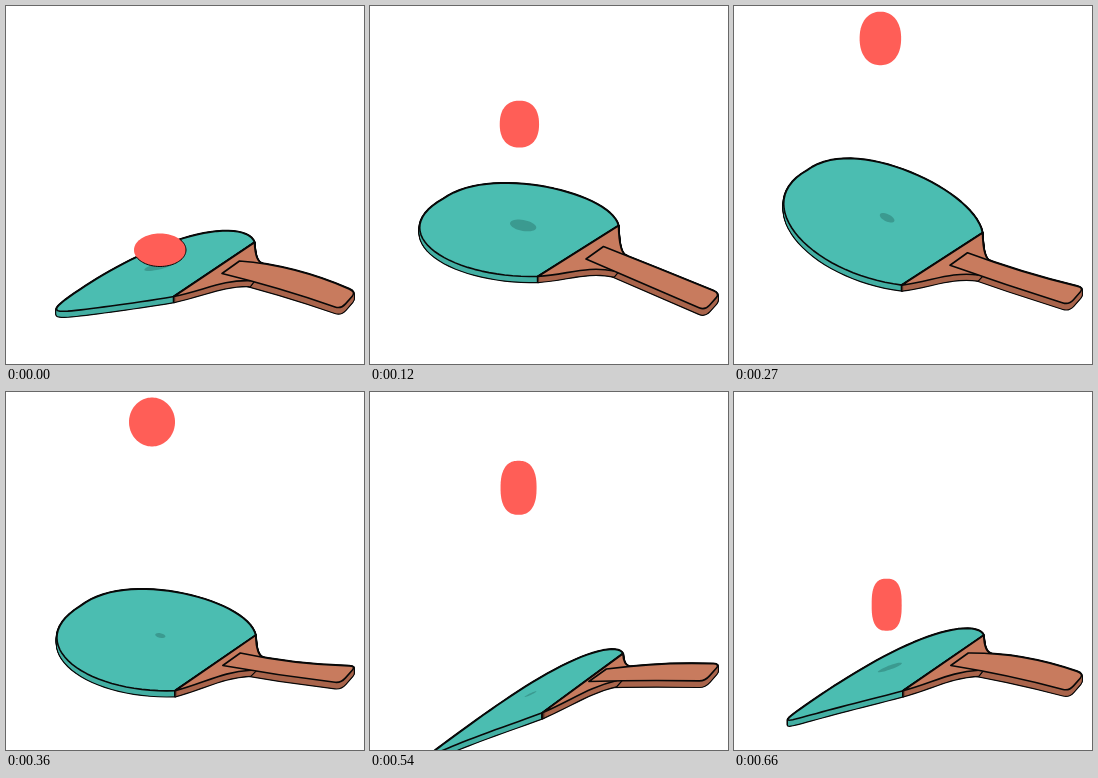
These frames come from a looping animation (358 px wide and 358 px high, 690 ms). An HTML page with a canvas:

```html
<!DOCTYPE html>
<html lang="en">
<head>
<meta charset="utf-8">
<title>Bouncing ball</title>
<style>
html, body { margin: 0; width: 100%; height: 100%; overflow: hidden; background: #fff; }
canvas { display: block; width: 358px; height: 358px; }
</style>
</head>
<body>
<canvas id="stage" width="358" height="358"></canvas>
<script>
const ctx = document.getElementById('stage').getContext('2d');
const LOOP = 690, STEP = 30;
const color = {
  rubber: '#4bbdb1', rubberSide: '#43afa3', wood: '#c87b5e', woodSide: '#a9644b',
  ball: '#ff5e57', shadow: '#3b9a90', ink: '#080808'
};

// Key poses of the swing; everything else is derived from these.
const keyTimes = [0, 60, 180, 360, 450, 540, 660];
const tracks = {
  hinge: [255, 246, 239, 261, 277, 277, 261],
  tilt: [20, -17, -78, -57, 30, 53, 38],
  bladeBend: [-9, 0, 0, 2, -6, -9, -9],
  grip: [286, 286, 288, 274, 270, 272, 282],
  handleBend: [-5.5, -1.5, 0, 3, 0.5, -2.5, -5.5],
  ballWidth: [26, 22, 18.7, 23, 21.5, 18, 15],
  ballHeight: [16.5, 19, 27.5, 24.5, 25.5, 27, 26],
  shadow: [1, 1, 0.67, 0.33, 0.23, 0.4, 0.8]
};

// Smooth periodic interpolation with parabolic tangents.
function sample(keys, t) {
  const n = keyTimes.length;
  let i = n - 1;
  while (keyTimes[i] > t) i--;
  const key = k => keys[(k + n) % n];
  const time = k => keyTimes[(k + n) % n] + Math.floor(k / n) * LOOP;
  const span = k => time(k + 1) - time(k);
  const slope = k => (key(k + 1) - key(k)) / span(k);
  const tangent = k =>
    (slope(k - 1) * span(k) + slope(k) * span(k - 1)) / (span(k - 1) + span(k));
  const h = span(i), s = (t - time(i)) / h, s2 = s * s, s3 = s2 * s;
  return key(i) * (2 * s3 - 3 * s2 + 1) + key(i + 1) * (3 * s2 - 2 * s3)
    + h * ((s3 - 2 * s2 + s) * tangent(i) + (s3 - s2) * tangent(i + 1));
}

function poseAt(t) {
  const pose = {};
  for (const name in tracks) pose[name] = sample(tracks[name], t);
  return pose;
}

const mix = (a, b, k) => [a[0] + (b[0] - a[0]) * k, a[1] + (b[1] - a[1]) * k];
const quadAt = (a, b, c, k) => mix(mix(a, b, k), mix(b, c, k), k);
const cubicAt = (a, b, c, d, k) => mix(quadAt(a, b, c, k), quadAt(b, c, d, k), k);

function closedPath(points) {
  const path = new Path2D();
  for (const p of points) path.lineTo(...p);
  path.closePath();
  return path;
}

// Flat blade: u runs along the hinge edge, v from the hinge to the tip.
function bladeShape(pose) {
  const drop = pose.hinge - 255, shift = 0.2 * Math.max(0, drop);
  const front = [168 + shift, 290.5 + 1.38 * drop];
  const back = [248.5 + shift, 236.5 + 1.15 * drop];
  const mid = mix(front, back, 0.5);
  const reach = -135 + 0.0023 * Math.max(0, pose.tilt) ** 2;
  const place = ([u, v]) => [
    mid[0] + u * (back[0] - front[0]) + v * reach,
    mid[1] + u * (back[1] - front[1]) + v * pose.tilt + 4 * v * (1 - v) * pose.bladeBend
  ];
  const outline = [];
  for (let i = 0; i <= 30; i++) {
    outline.push(cubicAt([-0.5, 0], [-0.9, 0.4], [-0.72, 1.03], [0, 1], i / 30));
  }
  for (let i = 1; i <= 30; i++) {
    outline.push(cubicAt([0, 1], [0.66, 1.03], [0.9, 0.3], [0.5, 0], i / 30));
  }
  return { front, back, place, path: closedPath(outline.map(place)) };
}

function shadowPath(blade, size) {
  const points = [];
  for (let i = 0; i < 40; i++) {
    const a = i * Math.PI / 20;
    points.push(blade.place([0.07 + 0.09 * size * Math.cos(a), 0.45 + 0.1 * size * Math.sin(a)]));
  }
  return closedPath(points);
}

function handleShape({ hinge, grip, handleBend }) {
  const shift = 0.13 * Math.max(0, hinge - 255);
  const inTop = [233.5 + shift, hinge], inLow = [216 + shift, hinge + 12.5];
  const outTop = [350, grip], outLow = [335, grip + 17];
  const bent = (a, b, bend) => {
    const m = mix(a, b, 0.5);
    return [m[0], m[1] + 2 * bend];
  };
  const topMid = bent(inTop, outTop, handleBend);
  const lowMid = bent(inLow, outLow, 0.3 * handleBend);
  const path = new Path2D();
  path.moveTo(...inTop);
  path.quadraticCurveTo(...mix(inTop, topMid, 0.94), ...quadAt(inTop, topMid, outTop, 0.94));
  path.quadraticCurveTo(...outTop, ...mix(outTop, outLow, 0.25));
  path.lineTo(...mix(outTop, outLow, 0.7));
  path.quadraticCurveTo(...outLow, ...quadAt(inLow, lowMid, outLow, 0.95));
  path.quadraticCurveTo(...mix(inLow, lowMid, 0.95), ...inLow);
  path.closePath();
  return {
    path,
    top: quadAt(inTop, topMid, outTop, 0.2),
    low: quadAt(inLow, lowMid, outLow, 0.235)
  };
}

function neckPath({ front, back }, handle) {
  const [ax, ay] = front, [bx, by] = back;
  const [hx, hy] = handle.top, [nx, ny] = handle.low;
  const dx = nx - ax, dy = ny - ay;
  const path = new Path2D();
  path.moveTo(ax, ay);
  path.lineTo(bx, by);
  path.quadraticCurveTo(bx + 0.5, hy - 2, hx, hy);
  path.lineTo(nx, ny);
  path.bezierCurveTo(nx - 27, ny - 8 - 0.45 * dy, ax + 0.4 * dx, ay + 0.4 * dy, ax, ay);
  path.closePath();
  return path;
}

// Launched by the blade, hangs briefly, then falls.
function ballCentre(t) {
  const rise = Math.max(0, 300 - t), fall = Math.max(0, t - 360);
  const flight = 30 + 0.00272 * rise ** 2 + 0.00203 * fall ** 2;
  const carried = 244 - 0.96 * t;
  return [146 + 8 * (t / 345 - 1) ** 2, t < 80 ? Math.min(carried, flight) : flight];
}

// Narrow balls get flatter sides.
function ballPath([x, y], rx, ry) {
  const power = 2 / (2 + Math.max(0, 23 - rx) * 0.09);
  const bulge = v => Math.sign(v) * Math.abs(v) ** power;
  const points = [];
  for (let i = 0; i < 90; i++) {
    const a = i * Math.PI / 45;
    points.push([x + rx * bulge(Math.cos(a)), y + ry * bulge(Math.sin(a))]);
  }
  return closedPath(points);
}

function fillPath(path, fill) {
  ctx.fillStyle = fill;
  ctx.fill(path);
}

function drawFace(path, fill) {
  fillPath(path, fill);
  ctx.lineWidth = 1.6;
  ctx.stroke(path);
}

function drawSide(path, depth, fill) {
  ctx.fillStyle = fill;
  ctx.lineWidth = 2.4;
  for (const paint of ['stroke', 'fill']) {
    for (let y = 0; y <= depth; y += 0.5) {
      ctx.save();
      ctx.translate(0, y);
      ctx[paint](path);
      ctx.restore();
    }
  }
}

function draw(t) {
  const pose = poseAt(t);
  const blade = bladeShape(pose);
  const handle = handleShape(pose);
  const neck = neckPath(blade, handle);
  const ball = ballPath(ballCentre(t), pose.ballWidth, pose.ballHeight);

  ctx.fillStyle = '#fff';
  ctx.fillRect(0, 0, 358, 358);
  ctx.strokeStyle = color.ink;
  ctx.lineJoin = 'round';

  drawSide(blade.path, 5.5, color.rubberSide);
  drawFace(blade.path, color.rubber);
  fillPath(shadowPath(blade, pose.shadow), color.shadow);

  drawSide(handle.path, 6, color.woodSide);
  drawSide(neck, 5.5, color.woodSide);
  drawFace(neck, color.wood);
  drawFace(handle.path, color.wood);

  fillPath(ball, color.ball);
  // The ball is outlined only where it covers the blade.
  ctx.save();
  ctx.clip(blade.path);
  ctx.lineWidth = 1;
  ctx.stroke(ball);
  ctx.restore();
}

const start = performance.now();
function tick() {
  const t = (performance.now() - start) % LOOP;
  draw(Math.floor(t / STEP) * STEP);
  requestAnimationFrame(tick);
}
tick();
</script>
</body>
</html>
```
